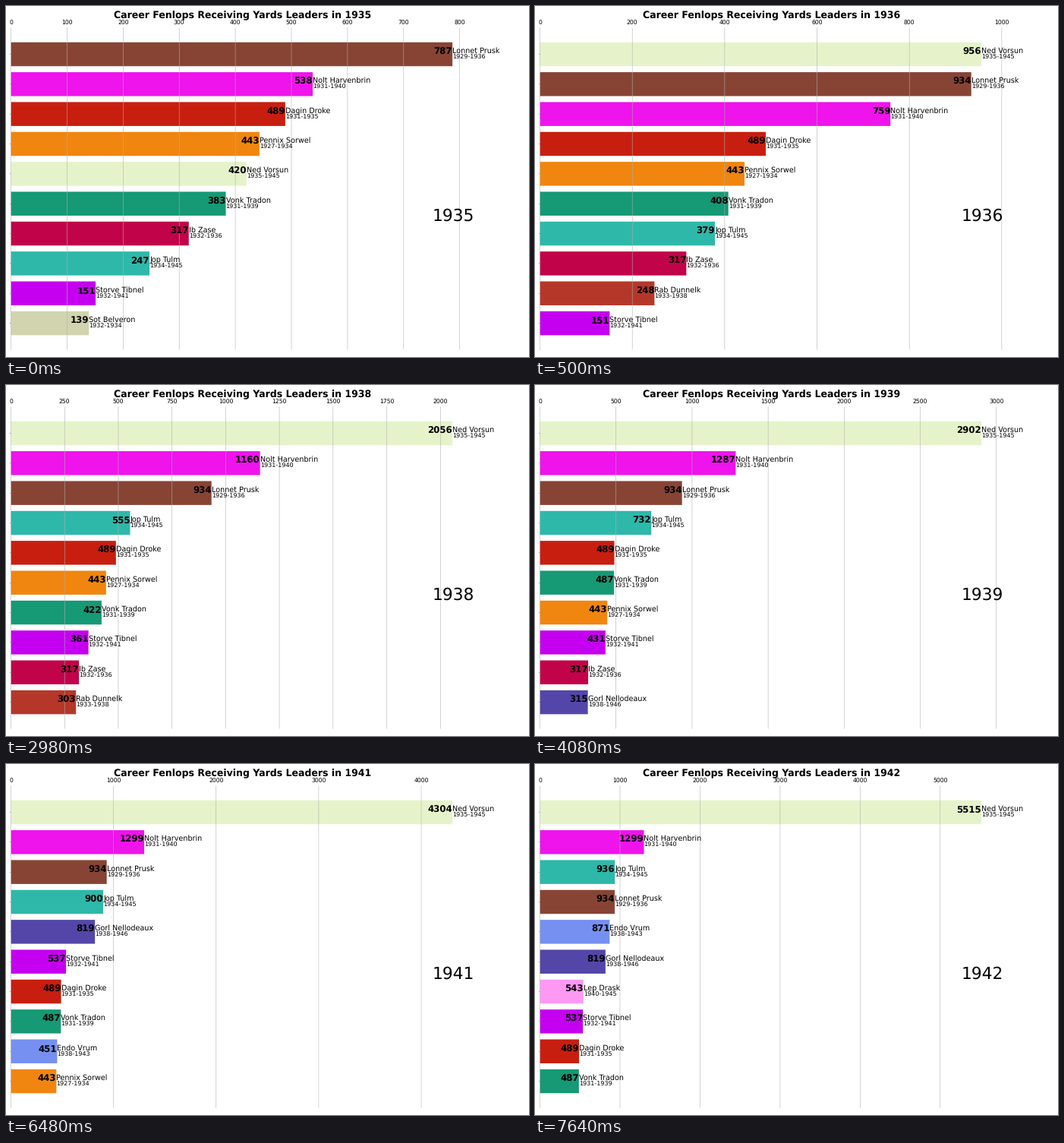
A matplotlib script for the animation above (8 s loop, 689 by 462 pixels).

```python
import numpy as np
import matplotlib.pyplot as plt
from matplotlib.animation import FuncAnimation
from matplotlib.patches import Rectangle

WIDTH, HEIGHT, DPI = 689, 462, 64
PT = 72 / DPI  # points per pixel
INTERVAL, LOOP = 20, 8000
FIRST_YEAR = 1935
CHANGES = [500, 1680, 2980, 4080, 5240, 6480, 7640]

LEFT, RIGHT, TOP, BOTTOM = 6.5, 617.2, 28.5, 452.5
BAR_SPAN = (RIGHT - LEFT) / 1.05
FIRST_ROW, PITCH, ROWS = 63.5, 39.34, 10
BAR_HEIGHT = 0.8 * PITCH

# name, career, colour, running totals (the last total is kept)
PLAYERS = [
    ("Lonnet Prusk", "1929-1936", "#874434", [787, 934]),
    ("Nolt Harvenbrin", "1931-1940", "#ef13ec", [538, 759, 996, 1160, 1287, 1299]),
    ("Dagin Droke", "1931-1935", "#c81e10", [489]),
    ("Pennix Sorwel", "1927-1934", "#f0860f", [443]),
    ("Ned Vorsun", "1935-1945", "#e6f3ca", [420, 956, 1508, 2056, 2902, 3566, 4304, 5515]),
    ("Vonk Tradon", "1931-1939", "#169975", [383, 408, 408, 422, 487]),
    ("Ib Zase", "1932-1936", "#c10449", [317]),
    ("Jop Tulm", "1934-1945", "#2eb8aa", [247, 379, 500, 555, 732, 792, 900, 936]),
    ("Storve Tibnel", "1932-1941", "#c500f0", [151, 151, 263, 361, 431, 459, 537]),
    ("Sot Belveron", "1932-1934", "#d1d4ae", [139]),
    ("Rab Dunnelk", "1933-1938", "#b5372a", [0, 248, 280, 303]),
    ("Gorl Nellodeaux", "1938-1946", "#5446a8", [0, 0, 0, 0, 315, 603, 819]),
    ("Endo Vrum", "1938-1943", "#7590f0", [0, 0, 0, 0, 0, 327, 451, 871]),
    ("Lep Drask", "1940-1945", "#fd99f4", [0, 0, 0, 0, 0, 0, 404, 543]),
]

plt.rcParams["font.family"] = "DejaVu Sans"
plt.rcParams["text.hinting"] = "none"

fig = plt.figure(figsize=(WIDTH / DPI, HEIGHT / DPI), dpi=DPI, facecolor="white")
ax = fig.add_axes([0, 0, 1, 1])
ax.set(xlim=(0, WIDTH), ylim=(HEIGHT, 0))
ax.axis("off")


def label(x, y, text, size, ha="left", weight="normal"):
    return ax.text(x, y, text, size=size * PT, ha=ha, va="baseline",
                   weight=weight, color="black")


def line(xs, ys, color, width):
    return ax.plot(xs, ys, color=color, lw=width * PT, snap=False,
                   solid_capstyle="butt", zorder=2)[0]


def tick_step(limit):
    """Smallest round step that splits the axis into at most nine parts."""
    steps = [m * 10 ** p for p in range(1, 5) for m in (1, 2, 2.5, 5)]
    return next(s for s in steps if s >= limit / 9)


def standings(index):
    rows = [(totals[min(index, len(totals) - 1)], name, career, color)
            for name, career, color, totals in PLAYERS]
    return sorted(rows, reverse=True)[:ROWS]


def build_chart(index):
    year = FIRST_YEAR + index
    rows = standings(index)
    leader = rows[0][0]
    scale = BAR_SPAN / leader
    artists = [
        label((LEFT + RIGHT) / 2, 16, f"Career Fenlops Receiving Yards Leaders in {year}",
              12.5, "center", "bold"),
        label(RIGHT, 283, str(year), 21.8, "right"),
    ]
    limit = leader * 1.05
    for value in np.arange(0, limit, tick_step(limit)):
        x = LEFT + value * scale
        artists.append(line([x, x], [TOP, BOTTOM], "#b0b0b0", 0.55))
        artists.append(label(x, 25, f"{value:.0f}", 7.6, "center"))

    for row, (yards, name, career, color) in enumerate(rows):
        y = FIRST_ROW + row * PITCH
        end = LEFT + yards * scale
        bar = Rectangle((LEFT, y - BAR_HEIGHT / 2), end - LEFT, BAR_HEIGHT,
                        facecolor=color, linewidth=0, snap=False, zorder=1)
        artists += [
            ax.add_patch(bar),
            label(end, y + 0.3, str(yards), 11.8, "right", "bold"),
            label(end, y - 1.7, name, 9.6),
            label(end, y + 6.4, career, 8),
        ]
    return artists


for row in range(ROWS):
    y = FIRST_ROW + row * PITCH
    line([5, LEFT], [y, y], "black", 0.35)

charts = [build_chart(i) for i in range(len(CHANGES) + 1)]


def update(frame):
    current = np.searchsorted(CHANGES, frame * INTERVAL, side="right")
    for i, chart in enumerate(charts):
        for artist in chart:
            artist.set_visible(i == current)
    return charts[current]


anim = FuncAnimation(fig, update, frames=LOOP // INTERVAL, interval=INTERVAL,
                     repeat=True, repeat_delay=0, blit=False)
plt.show()
```
